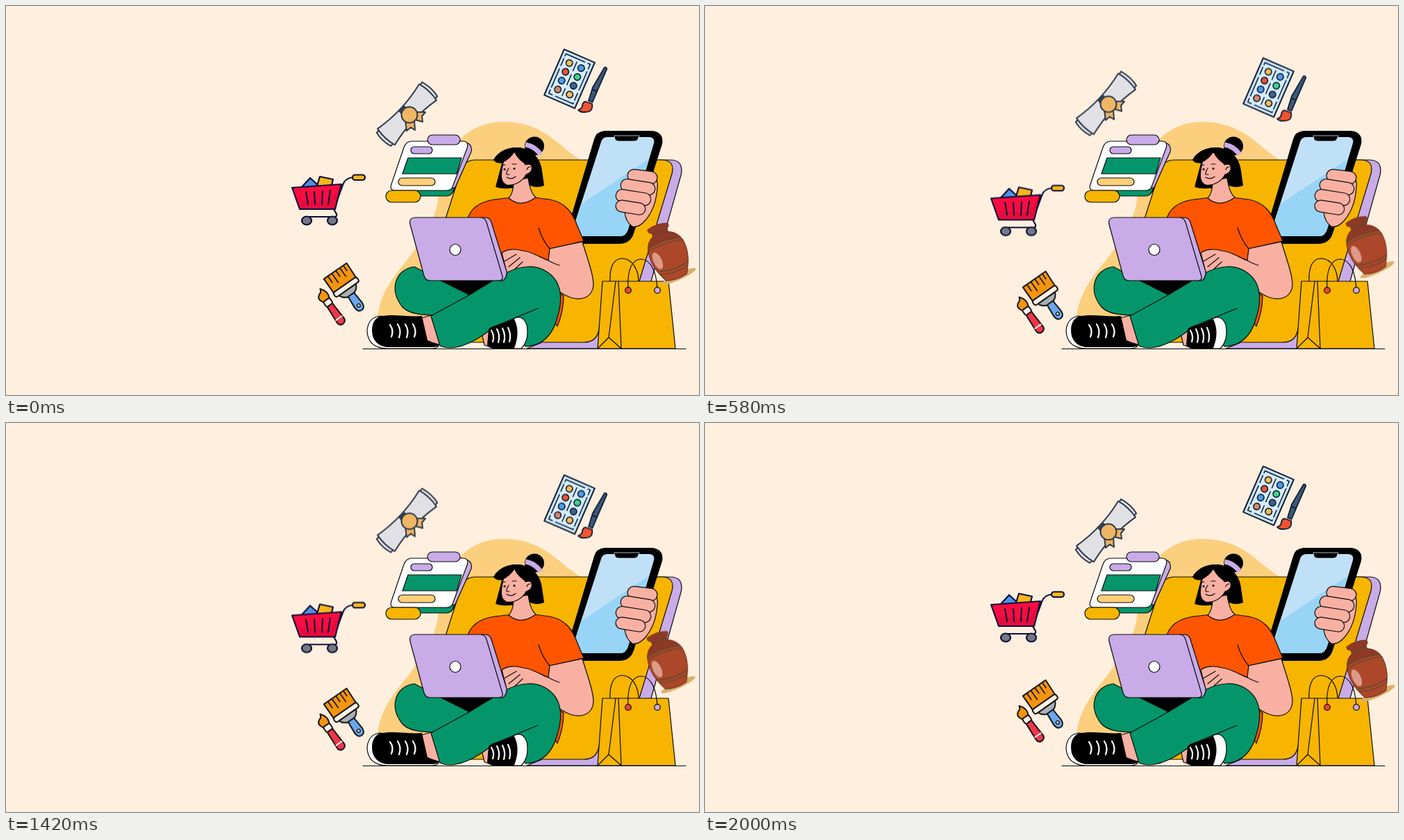
Animation of 998 by 561 pixels, one loop 2080 ms. Source, as an HTML page without scripts:

```html
<!DOCTYPE html>
<html lang="en">
<head>
<meta charset="utf-8">
<title>Shopping from home</title>
<style>
  html, body { margin: 0; width: 100%; height: 100%; overflow: hidden; background: #ffefdf; }
  svg { display: block; width: 100vw; height: 100vh; }
  .ln { stroke: #0b0b0b; stroke-width: 1.2; stroke-linejoin: round; stroke-linecap: round; }
  .no { fill: none; }
  .yel { fill: #f7b500; }
  .pur { fill: #c9abe8; }
  .grn { fill: #04966a; }
  .org { fill: #ff5500; }
  .skin { fill: #f8b0a2; }
  .ink { stroke: #0e0e35; stroke-width: 2.2; stroke-linejoin: round; stroke-linecap: round; }
  .slate { stroke: #303a4b; stroke-width: 2; stroke-linejoin: round; }
  .lace { fill: none; stroke: #fff; stroke-width: 2.2; stroke-linecap: round; }

  /* 25 ticks per loop: 12 out, 12 back, one at rest */
  .float { animation: float 2080ms -4ms infinite; }
  .vase { animation: vase 2080ms -4ms infinite; }
  @keyframes float {
    0% { transform: translateY(0); animation-timing-function: steps(12, end); }
    48% { transform: translateY(var(--d)); animation-timing-function: steps(12, end); }
    96%, 100% { transform: translateY(0); }
  }
  @keyframes vase {
    0% { transform: translate(0, 0); animation-timing-function: step-end; }
    4% { transform: translate(0, 1.2px); animation-timing-function: steps(11, end); }
    48% { transform: translate(-1.3px, -18.6px); animation-timing-function: step-end; }
    52% { transform: translate(-1.3px, -19.8px); animation-timing-function: steps(11, end); }
    96%, 100% { transform: translate(0, 0); }
  }
</style>
</head>
<body>
<svg viewBox="0 0 998 561" preserveAspectRatio="none">
  <path fill="#fccf7f" d="M535 449C540 402 572 378 590 349C612 314 622 300 623 266C628 210 662 167 716 167C776 167 796 204 828 222V449Z"/>

  <!-- chair -->
  <path class="pur ln" d="M750 494L770 486L930 222H956Q977 222 972 244L929 397L880 420L853 494Z"/>
  <path class="yel ln" d="M632 310L655 238Q660 222 676 222H944Q964 222 959 242L912 397L866 420L853 470Q849 485 832 485H640Z"/>

  <!-- card -->
  <path class="pur ln" d="M655 195Q673 197 670 210L645 266Q642 273 634 273Z"/>
  <path class="grn ln" d="M590 262H646L643 269Q640 274 634 274H596Z"/>
  <path class="ln" fill="#fff" d="M585 195H658Q667 195 664 205L643 261Q641 266 635 266H560Q552 266 555 257L573 204Q576 195 585 195Z"/>
  <path class="grn ln" d="M579 219H656L649 242H571Z"/>
  <rect class="pur ln" x="607" y="186" width="47" height="14" rx="7"/>
  <rect class="pur ln" x="583" y="203" width="31" height="10" rx="5"/>
  <rect class="ln" fill="#ffcf78" x="565" y="248" width="53" height="11" rx="5.5"/>
  <rect class="yel ln" x="547" y="266" width="50" height="17" rx="8.5"/>

  <!-- phone -->
  <path d="M862 180H930Q948 182 945 199L904 328Q899 343 883 343H820L812 310L847 192Q850 181 862 180Z"/>
  <path fill="#c0e0f8" d="M866 189H927Q935 190 933 198L896 322Q893 332 884 332H822L818 317L857 196Q859 189 866 189Z"/>
  <path fill="#97d4f5" d="M828 286L925 221L896 322Q893 332 884 332H822L818 317Z"/>
  <path d="M876 187H912L910 192Q909 195 905 195H882Q878 195 877 192Z" stroke="#cfe4f4" stroke-width=".8"/>
  <g class="skin ln">
    <path d="M925 238Q940 245 938 262Q936 292 920 310Q911 320 902 318Q893 312 891 298Z"/>
    <rect x="895" y="237" width="43" height="18" rx="9" transform="rotate(7 916 246)"/>
    <rect x="885" y="252" width="50" height="18" rx="9" transform="rotate(9 910 261)"/>
    <rect x="878" y="267" width="51" height="18" rx="9" transform="rotate(9 903 276)"/>
    <rect x="878" y="282" width="43" height="17" rx="8.5" transform="rotate(9 899 290)"/>
  </g>

  <!-- torso -->
  <path class="org ln" d="M794 412L803 418Q803 440 794 462L780 440Z"/>
  <path class="org ln" d="M664 310C668 292 682 282 704 279L730 276H760L783 279C806 283 816 299 822 315L832 339L783 350L779 390H690Z"/>
  <path class="skin ln" d="M783 350L830 340C838 366 846 388 846 402C845 420 829 426 812 420C794 413 780 397 764 392L722 388L714 356C722 350 735 350 744 353C757 354 768 362 781 367Z"/>
  <path class="no ln" d="M767 320Q773 339 783 350M781 367Q790 372 797 374M718 368L735 358M724 376L740 363M730 382L744 369"/>

  <!-- head -->
  <path d="M702 222C708 210 722 203 738 204C758 206 770 220 772 238L775 259Q764 264 750 257L738 262L724 263Q714 264 705 261L714 227Z"/>
  <ellipse cx="761" cy="202" rx="14" ry="13.500"/>
  <path d="M748 200Q761 202 770 214" fill="none" stroke="#c9abe8" stroke-width="7"/>
  <path class="skin ln" d="M731 252Q731 270 724 277Q741 292 763 276Q755 270 752 248Z"/>
  <path class="skin ln" d="M717 222C712 242 711 254 721 258C732 260 744 253 749 243Q759 240 757 231Q754 225 748 229L735 208Q726 216 717 222Z"/>
  <path d="M702 222Q714 204 738 204Q758 206 764 228L750 229Q738 223 732 211Q727 220 715 226Q706 228 702 222Z"/>
  <path class="no ln" d="M724 234Q720 240 721 243H725M721 247Q728 251 734 246M714 230L719 229M729 228L735 228M750 236Q751 232 755 232"/>
  <circle cx="718" cy="235.500" r="1.500"/><circle cx="732" cy="234.500" r="1.500"/>

  <!-- legs and shoes -->
  <path d="M622 394H716L668 418Z"/>
  <path class="grn ln" d="M588 376C560 380 552 409 570 433C579 444 598 446 622 446L668 417L626 396Z"/>
  <path class="skin ln" d="M598 450L613 446L627 489L606 486Z"/>
  <path class="skin ln" d="M685 472L698 462V492L689 489Z"/>
  <path class="grn ln" d="M612 447L665 418L718 386C740 374 764 372 780 384C801 398 802 424 794 449C787 476 772 490 748 491L728 455L706 461C686 476 664 492 640 493Q631 493 625 490Z"/>
  <path class="no ln" d="M766 436L706 461"/>
  <path class="ln" fill="#fff" d="M540 447Q522 448 520 468Q521 493 548 494H614Q624 493 623 488L590 480Z"/>
  <path d="M537 448C558 443 580 449 599 447L607 482Q614 485 623 488Q624 492 612 492H548Q533 490 528 476Q524 456 537 448Z"/>
  <path class="lace" d="M553 460Q559 468 555 477M564 459Q570 468 566 478M575 459Q581 468 577 478M586 459Q592 468 588 477"/>
  <path d="M695 466Q700 461 710 460L737 449L740 494H704Q695 494 693 489Z"/>
  <path class="ln" fill="#fff" d="M731 451Q744 444 750 460Q754 482 742 494H731Q741 470 731 451Z"/>
  <path class="lace" d="M699 468Q704 476 701 484M707 466Q712 475 709 485M715 465Q720 475 717 485M723 464Q728 474 725 484"/>

  <!-- laptop -->
  <path class="pur ln" d="M684 305H690Q697 305 699 312L721 383Q722 390 716 396H704Z"/>
  <path class="pur ln" d="M590 305H683Q690 305 692 312L715 390Q716 396 710 396H611Q604 396 602 389L582 315Q580 305 590 305Z"/>
  <circle class="ln" fill="#fff" cx="647" cy="351.500" r="8"/>

  <!-- bag -->
  <path class="no ln" d="M870 398C869 378 874 364 888 364C902 365 911 380 911 398"/>
  <path class="yel ln" d="M859 397H954L964 494H852Z"/>
  <path class="no ln" d="M882 397L886 494L868 478L852 494M878 397L868 478"/>
  <path class="no ln" d="M896 409C894 380 902 365 915 365C930 366 937 386 938 409"/>
  <circle class="ln" fill="#f0452c" cx="896" cy="410" r="4.300"/>
  <circle class="pur ln" cx="938" cy="410" r="4.300"/>
  <path class="ln" d="M514 494.500H979"/>

  <g class="vase">
    <ellipse cx="969" cy="390" rx="27" ry="5" fill="#d9b068" transform="rotate(-25 969 390)"/>
    <g transform="translate(953.500 356) rotate(-19)">
      <path fill="#ad472a" stroke="#6d2c1c" stroke-width="1" d="M-17 -41Q-2 -46 13 -41Q15 -37 10 -34V-29Q25 -23 27 -6C29 12 21 27 16 37Q0 42 -16 37C-21 27 -29 12 -27 -6Q-26 -23 -13 -29V-34Q-19 -37 -17 -41Z"/>
      <path fill="#8c3a25" d="M-17 -41Q-2 -46 13 -41Q15 -37 10 -34V-29Q20 -25 25 -15Q0 -21 -25 -15Q-21 -25 -13 -29V-34Q-19 -37 -17 -41Z"/>
      <path fill="none" stroke="#5e4a2b" stroke-width="1.300" d="M-13 -33Q-1 -30 10 -33M-25 -15Q0 -21 25 -15M-26 -11Q0 -17 27 -11M-23 21Q0 28 23 21M-20 26Q0 33 21 26"/>
      <ellipse cx="-18" cy="6" rx="6" ry="13" fill="#dc9b87" transform="rotate(-6 -18 6)"/>
    </g>
  </g>

  <!-- palette and paintbrush -->
  <g class="float" style="--d:21.6px">
    <g transform="translate(811.5 105) rotate(23.5)" stroke="#101d33" stroke-width="2">
      <rect x="-24" y="-36" width="48" height="72" fill="#c8e4fb" stroke-linejoin="round"/>
      <rect x="-19" y="-31" width="38" height="62" fill="#d5ecfd" stroke-width="1.500" stroke-dasharray="30 4 12 3"/>
      <path d="M0 -27V-12M0 -7V10M0 15V27" stroke-width="1.500"/>
      <g stroke-width="1.700">
        <circle cx="-9.300" cy="-20.800" r="4.700" fill="#f7bd50"/>
        <circle cx="-9.300" cy="-6.900" r="4.700" fill="#f0522d"/>
        <circle cx="-9.300" cy="6.900" r="4.700" fill="#4c9bea"/>
        <circle cx="-9.300" cy="20.800" r="4.700" fill="#d88567"/>
        <circle cx="9.300" cy="-20.800" r="4.700" fill="#4c9bea"/>
        <circle cx="9.300" cy="-6.900" r="4.700" fill="#3fd68a"/>
        <circle cx="9.300" cy="6.900" r="4.700" fill="#3f638b"/>
        <circle cx="9.300" cy="20.800" r="4.700" fill="#f7bd50"/>
      </g>
    </g>
    <g stroke="#101d33" stroke-width="1.800" stroke-linejoin="round">
      <path fill="#3d5878" transform="translate(849 118) rotate(20)" d="M2 -32Q4 -34 6 -31L4 1L3 21H-3L-4 1ZM-4 4H4"/>
      <path fill="#ee5431" d="M835 138L844 141Q846 153 834 153Q828 154 824 150Q830 148 830 143Q831 138 835 138Z"/>
    </g>
  </g>

  <!-- diploma -->
  <g class="float" style="--d:-26.4px">
    <g class="slate" fill="#e1e1e5" transform="translate(577.5 156.500) rotate(-47)">
      <path d="M38 -14L49 -16Q53 0 49 14L38 14ZM-38 -14L-49 -14Q-53 0 -49 14L-38 14Z"/>
      <path d="M-44 -17Q0 -8 44 -17Q48 0 44 17Q0 8 -44 17Q-48 0 -44 -17Z"/>
      <path d="M-4 -11H6V11H-4Z" fill="#3d4f78"/>
    </g>
    <path class="slate" fill="#edb463" d="M575 165L577 180L583 175L589 179L588 165ZM589 164L600 167L599 159L604 153L590 153Z"/>
    <circle class="slate" fill="#efb664" cx="581" cy="157" r="11.500"/>
  </g>

  <!-- cart -->
  <g class="float ink" style="--d:26.4px">
    <path fill="#4f92e4" d="M426 261L438 248L449 258L446 264H428Z"/>
    <path fill="#f8b51c" d="M452 246L471 250L468 262L447 262Z"/>
    <path class="no" d="M472 293L485 258Q488 248 500 247"/>
    <path class="no" d="M472 293L476 300Q477 304 473 304H430"/>
    <path fill="#f90c42" d="M412 262L483 257L474 293H423Z"/>
    <path fill="#c80b38" stroke="none" d="M418 278L440 281L466 283L480 262L473 292H424Z" opacity=".4"/>
    <path class="no" d="M432 268L435 286M444 268L445 286M456 267L455 286M467 266L464 286"/>
    <rect x="499" y="243.500" width="18" height="7.500" rx="3.700" fill="#f8b51c"/>
    <ellipse cx="433" cy="309.500" rx="7" ry="6" fill="#737984"/>
    <ellipse cx="470" cy="309.500" rx="7" ry="6" fill="#737984"/>
  </g>

  <!-- brushes -->
  <g class="float" style="--d:20.4px" stroke="#151515" stroke-width="2" stroke-linejoin="round" stroke-linecap="round">
    <g transform="translate(490 406.500) rotate(-35)">
      <path fill="#6aa7ec" d="M-5 10H5L6.500 31Q6 39 0 39Q-6 39 -6.500 31Z"/>
      <circle cy="31" r="2.300" fill="#fff" stroke-width="1.500"/>
      <path fill="#aab0b8" d="M-15 3H15Q12 10 6 12H-6Q-12 10 -15 3Z"/>
      <path fill="#f4940f" d="M-19 -29H21L20 -4H-19Z"/>
      <path fill="none" d="M-12 -28V-18M-5 -28V-13M2 -28V-19M9 -28V-14M15 -28V-20" stroke-width="1.700"/>
      <rect x="-20" y="-5" width="41" height="8" rx="3" fill="#fff4e5"/>
    </g>
    <g transform="translate(464 428) rotate(-35)">
      <path fill="#ee3648" d="M-4.500 4H4.500L6 32Q5 37 0 37Q-5 37 -6 32Z"/>
      <path d="M-5 27H5" stroke="#fff" stroke-width="2"/>
      <path fill="#f4940f" d="M2 -23Q10 -14 5 -4H-5Q-11 -13 -4 -17Q1 -18 2 -23Z"/>
      <rect x="-5.500" y="-5" width="11" height="9" rx="2" fill="#fff4e5"/>
    </g>
  </g>
</svg>
</body>
</html>
```
